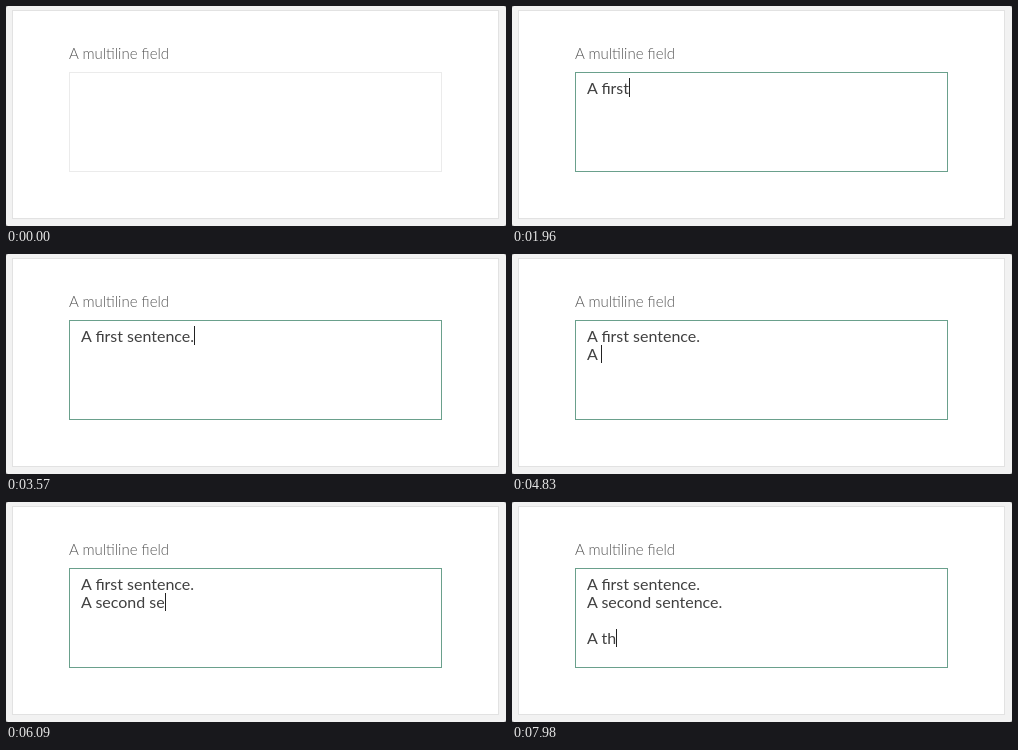
An HTML page that plays this animation: 500x220 px, repeating every 8 s.

```html
<!DOCTYPE html>
<html lang="en">
<head>
<meta charset="utf-8">
<title>Multiline field</title>
<style>
  html, body { margin: 0; width: 100%; height: 100%; overflow: hidden; background: #8a8a8a; }
  svg { display: block; font-family: Lato, sans-serif; }
  text { white-space: pre; }
  .label { font-size: 15px; font-weight: 300; fill: #555; }
  .line { font-size: 16px; fill: #404040; }
</style>
</head>
<body>
<svg width="500" height="220" viewBox="0 0 500 220">
  <rect width="500" height="220" rx="2.5" fill="#f2f2f2"/>
  <rect x="6.5" y="4.5" width="486" height="208" fill="#fff" stroke="#e2e2e2"/>
  <text class="label" x="63" y="53">A multiline field</text>
  <rect id="field" x="63.5" y="66.5" width="372" height="99" fill="#fff"/>
  <text class="line" x="75" y="88"></text>
  <text class="line" x="75" y="106"></text>
  <text class="line" x="75" y="124"></text>
  <text class="line" x="75" y="142"></text>
  <rect id="caret" width="1" fill="#222"/>
</svg>
<script>
const LOOP = 8000, TICK = 70, FOCUS = 420, BLINK = 560;
const IDLE = [235, 235, 235], ACTIVE = [106, 160, 140];
const field = document.getElementById('field');
const caret = document.getElementById('caret');
const lines = [...document.querySelectorAll('.line')];

// Each burst: start time, typed text, ticks between its keystrokes.
const bursts = [
  [1120, 'A', ''],
  [1400, ' first se', '22121212'],
  [2450, 'ntence', '11222'],
  [3570, '.', ''],
  [3850, '\n', ''],
  [4480, 'A', ''],
  [4830, ' second ', '2222212'],
  [5880, 'sentence.', '22112112'],
  [7000, '\n\n', '2'],
  [7560, 'A th', '222']
];
const keys = bursts.flatMap(([time, text, gaps]) =>
  [...text].map((char, i) => {
    if (i) time += gaps[i - 1] * TICK;
    return { time, char };
  }));

function draw(t) {
  const p = Math.min(1, Math.max(0, (Math.floor(t / TICK) * TICK - FOCUS + TICK) / 350));
  const mix = p * p * (3 - 2 * p);
  field.setAttribute('stroke', `rgb(${IDLE.map((c, i) => Math.round(c + (ACTIVE[i] - c) * mix))})`);

  const typed = keys.filter(k => k.time <= t);
  const rows = typed.map(k => k.char).join('').split('\n');
  lines.forEach((line, i) => line.textContent = rows[i] || '');

  const row = rows.length - 1;
  const top = row ? 73 + 18 * row : 72;
  const width = rows[row] ? lines[row].getComputedTextLength() : 0;
  const idle = t - (typed.length ? typed[typed.length - 1].time : FOCUS);
  caret.setAttribute('x', Math.round(75 + width));
  caret.setAttribute('y', top);
  caret.setAttribute('height', 91 + 18 * row - top);
  caret.setAttribute('visibility', idle >= 0 && idle % (2 * BLINK) < BLINK ? 'visible' : 'hidden');
}

const start = performance.now();
function frame() {
  draw((performance.now() - start) % LOOP);
  requestAnimationFrame(frame);
}
frame();
</script>
</body>
</html>
```
